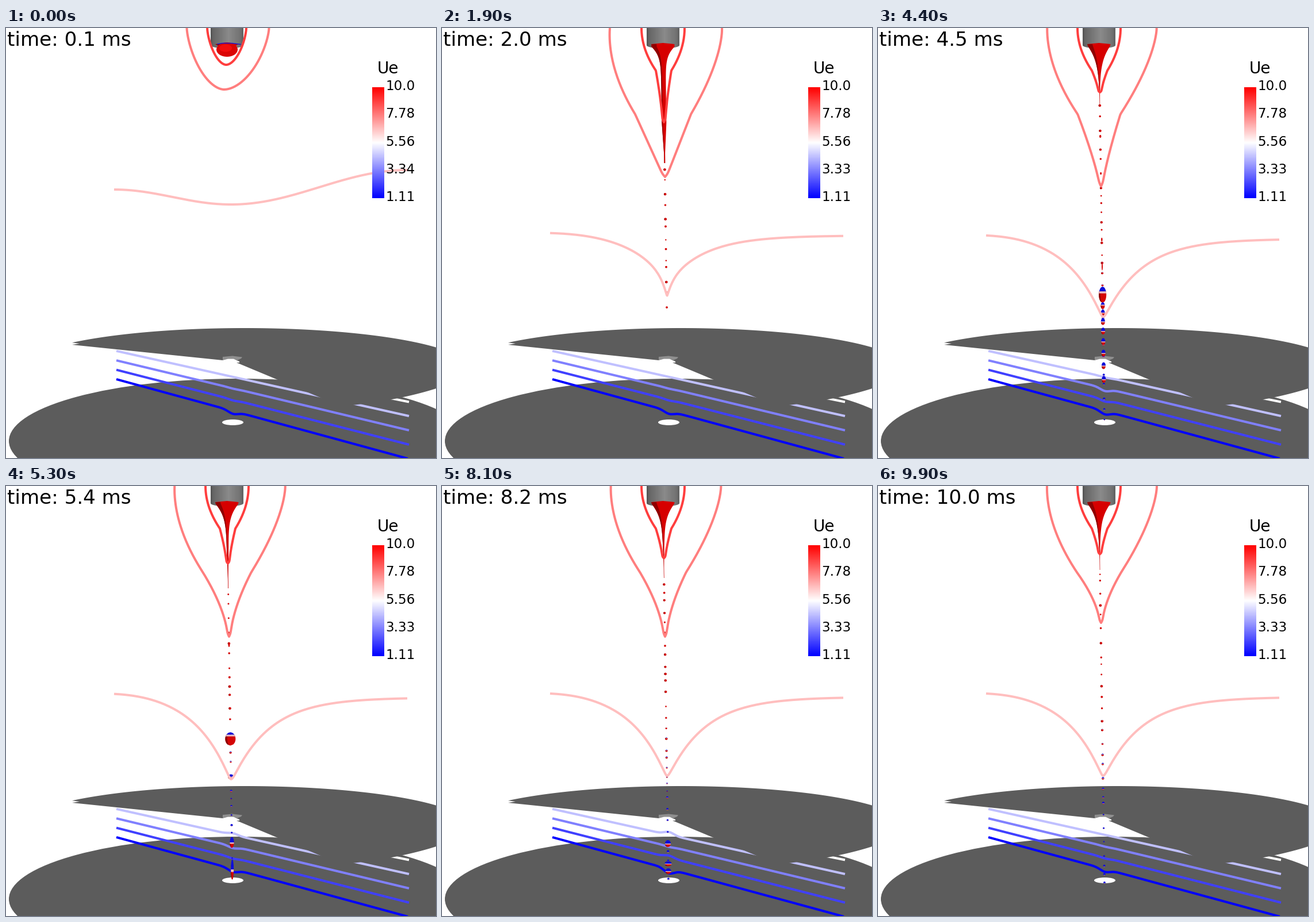
A matplotlib script for the animation above (10 s loop, 748x748 px).

```python
import numpy as np
import matplotlib.pyplot as plt
from matplotlib.animation import FuncAnimation
from matplotlib.collections import PolyCollection
from matplotlib.patches import Ellipse, Polygon

SIZE, DPI, FRAMES = 748, 100, 100
PX = 72 / DPI
GREY = "#5c5c5c"
FALL = 28        # drop speed, pixels per frame
FLOOR = 690
FIRST = 19       # frame at which the first jet is fully drawn out

# Turning points of the pulsating jet: lowest points of jet and contours
POSE = [0, FIRST, 35, 53, 66, 81, 99]
JET_TIP = [235, 235, 88, 178, 108, 160, 146]
MID_TIP = [107, 259, 289, 262, 297, 262, 238]
FAR_TIP = [466, 466, 495, 510, 497, 504, 504]
NECK = [1, 1, 0.9, 1.6, 3, 1.6, 1.6]

# Merged drops: frame, height, half width, half height
BLOBS = [(35, 212, 6.5, 14), (35, 481, 4, 4.5), (35, 582, 4.8, 5.5),
         (53, 440, 9, 11.5), (53, 506, 5, 4.5), (53, 620, 3.6, 9.5), (53, 667, 2.5, 18),
         (66, 288, 4.6, 5), (66, 311, 4, 4), (66, 640, 7.5, 23),
         (81, 622, 5, 6), (81, 657, 6, 4.5), (81, 670, 5, 5)]
BLOBS += [(35, 231 + 12 * i + 0.9 * i * i, 3.5, 6) for i in range(8)]

plt.rcParams["font.family"] = "DejaVu Sans"
fig = plt.figure(figsize=(SIZE / DPI, SIZE / DPI), dpi=DPI, facecolor="white")
ax = fig.add_axes([0, 0, 1, 1])


def level(v):
    return plt.cm.bwr((v - 1) / 8)


def ease(t):
    t = np.clip(t, 0, 1)
    return t * t * (3 - 2 * t)


def mix(a, b, t):
    return a + (b - a) * t


def pulse(values, n):
    """Eased value between the turning points."""
    k = min(int(np.searchsorted(POSE, n, side="right")) - 1, len(POSE) - 2)
    return mix(values[k], values[k + 1], ease((n - POSE[k]) / (POSE[k + 1] - POSE[k])))


def axis_x(y):
    return 384.4 + 0.0145 * (y - 30)


# Contours
DEPTH = 1 - np.linspace(1, 0, 120) ** 1.5


def flank(tip, knee, top, drop, bend, spread, neck):
    """Half width of a contour: a round shoulder above a narrowing neck."""
    y = DEPTH * tip
    k = min(knee, 0.85 * tip)

    def shoulder(h):
        return top - drop * (h / knee) ** bend + spread * (3 + 0.08 * h)

    v = np.clip((tip - y) / (tip - k), 0, 1)
    tail = (shoulder(k) - 2.5) * v ** neck + 2.5 * np.tanh(20 * v)
    return np.where(y < k, shoulder(y), tail)


def hanging(tip, grown, center, bell, left, right, *shape):
    """Contour around the jet, growing from a bell into its drawn-out form."""
    rest = np.maximum(1 - DEPTH ** 1.5, 0) ** 0.55
    w0, w1 = (mix(b * rest, flank(tip, *side, *shape), grown)
              for b, side in zip(bell, (left, right)))
    y = DEPTH * tip
    c = mix(*center, grown)
    return np.r_[c - w0, (c + w1)[::-1]], np.r_[y, y[::-1]]


FAR_X = np.r_[np.linspace(188, 375, 50), np.linspace(376, 408, 50), np.linspace(409, 698, 60)]


def far_contour(tip, grown, spike):
    d = FAR_X - 391.5
    left = d < 0
    u = np.abs(d) / np.where(left, 203.5, 306.5)
    rest = 307 - np.where(left, 13, 30) * (1 - np.cos(np.pi * u))
    edge = np.where(left, 356 + 0.1 * (tip - 466), 361 + 0.16 * (tip - 466))
    base = tip - 26 * spike
    r = np.hypot(u, 0.012) - 0.012
    rise = 1 - np.exp(-np.where(left, 3.4 * r + 1.5 * r**4, 4.7 * r))
    steady = base - (base - edge) * rise + 26 * spike * np.exp(-np.abs(d) / 9)
    return FAR_X, mix(rest, steady, grown)


# Drops: a seeded stream of small ones plus the merged ones
rng = np.random.default_rng(4)
BORN = FIRST - (486 - 60) / FALL + np.cumsum(np.r_[0, rng.uniform(0.35, 0.95, 170)])
RADIUS = rng.uniform(1.2, 2.3, BORN.size)


def merged(n):
    for at, y0, w, h in BLOBS:
        y = y0 + FALL * (n - at)
        if 0 < y < FLOOR:
            size = min(1, (y / y0) ** 2)
            yield y, w * size, h * size


def band(x, y, w, h, u0, u1, left=-1, right=1):
    """Slice of an ellipse between relative heights u0 and u1."""
    u = np.linspace(u0, u1, 11)
    r = w * np.sqrt(np.clip(1 - u * u, 0, 1))
    return np.r_[np.c_[x + left * r, y + u * h],
                 np.c_[x + right * r, y + u * h][::-1]]


def drop_shapes(n, tip):
    drops = [(60 + FALL * (n - b), r, r) for b, r in zip(BORN, RADIUS)] + list(merged(n))
    polys, colors = [], []

    def add(color, *args):
        polys.append(band(*args))
        colors.append(color)

    for y, w, h in drops:
        if not tip < y < FLOOR:
            continue
        x = axis_x(y)
        blue = 0 if n <= FIRST else np.clip((y - 400) / 220, 0, 0.5 if h > 4 else 0.85)
        cut = 2 * blue - 1
        add((0.83, 0.02, 0.02), x, y, w, h, cut, 1)
        if w > 2:
            add((0.55, 0, 0), x, y, w, h, cut, 1, -1, -0.6)
        if blue > 0:
            add((0.05, 0.05, 0.85), x, y, w, h, -1, cut)
            if w > 1.5:
                add((0.9, 0.75, 0.78), x, y, w, h, cut, min(1, cut + 0.25))
    return polys, colors


# Plates
ax.add_patch(Ellipse((405, 718.5), 800, 217, fc=GREY, zorder=1))
ax.add_patch(Ellipse((394.5, 686), 37, 10, fc="white", zorder=1.5))
x = np.linspace(115, 765, 140)
rim = np.c_[x, 592 - 70 * np.sqrt(1 - ((x - 415) / 390) ** 2)]
t = np.linspace(0, 1, 30)[:, None]
under = ((1 - t) ** 2 * np.array([750, 626.5]) + 2 * t * (1 - t) * np.array([680, 649])
         + t**2 * np.array([583, 658]))
cut_edge = [(401, 582), (406, 582), (406, 580), (401, 578), (377, 578), (115, 551), (128, 549)]
ax.add_patch(Polygon(np.r_[rim, under, cut_edge], fc=GREY, lw=0, zorder=3))
ax.add_patch(Polygon([(377, 572), (394, 570.5), (411, 572.5), (409, 575), (402, 578),
                      (396, 575.5), (386, 575.5), (377, 578)], fc="#8f8f8f", lw=0, zorder=3.1))
ax.add_patch(Polygon([(377, 578), (386, 575.5), (396, 575.5), (401, 578)],
                     fc="white", lw=0, zorder=3.2))
ax.plot([560, 701], [622, 650.5], color="white", lw=4 * PX, solid_capstyle="butt", zorder=2)

# Nozzle
shade = np.interp(np.linspace(0, 1, 57), [0, 0.08, 0.55, 0.9, 1], [0.33, 0.4, 0.54, 0.45, 0.38])
nozzle = ax.imshow(shade[None], cmap="gray", vmin=0, vmax=1, extent=(356, 413, 36, 0),
                   aspect="auto", zorder=4)
a = np.linspace(0, np.pi, 40)
body = Polygon(np.r_[[(356, 0), (413, 0)],
                     np.c_[384.5 + 28.5 * np.cos(a), 30 + 5.5 * np.sin(a)]],
               fc="none", ec="none")
ax.add_patch(body)
nozzle.set_clip_path(body)

# Colour bar
ax.imshow(np.linspace(1, 0, 256)[:, None], cmap="bwr", extent=(637, 658, 296, 103),
          aspect="auto", zorder=7)
ax.text(646, 79, "Ue", size=28 * PX, zorder=8)
labels = [ax.text(660, 108 + 48.25 * i, s, size=23 * PX, zorder=8)
          for i, s in enumerate(("10.0", "7.78", "5.56", "3.33", "1.11"))]
clock = ax.text(2, 30.5, "", size=34.1 * PX, zorder=8)


def stroke(v, z, w=4):
    return ax.plot([], [], color=level(v), lw=w * PX, solid_capstyle="butt",
                   solid_joinstyle="round", zorder=z)[0]


far, mid, near = (stroke(v, 6) for v in (6, 7, 8))
rays = [(stroke(4 - i, 2), 561.8 + 16.4 * i, 0.2224 + 0.0166 * i) for i in range(4)]
ray_x = np.linspace(192, 701, 255)

jet = Polygon([(0, 0)] * 3, fc=(0.84, 0, 0), lw=0, zorder=5)
jet_shade = Polygon([(0, 0)] * 3, fc=(0.56, 0, 0), lw=0, zorder=5.1)
ball = Ellipse((384.5, 37.5), 37, 25, fc=(0.86, 0.02, 0.02), zorder=5.2)
gloss = Ellipse((382, 35), 22, 13, fc=(0.95, 0.05, 0.05), zorder=5.3)
for p in (jet, jet_shade, ball, gloss):
    ax.add_patch(p)
lip, = ax.plot([368, 376, 393, 408], [28, 26.5, 26.5, 28.5], color=(0.1, 0.1, 0.8),
               lw=1.5 * PX, zorder=5.4)
spray = PolyCollection([], lw=0, zorder=5.5)
ax.add_collection(spray)

ax.set_xlim(0, SIZE)
ax.set_ylim(SIZE, 0)
ax.axis("off")


def draw_jet(tip, start):
    pull = np.clip((tip - 88) / 147, 0, 1)
    length = mix(8, 37 - 0.09 * tip, start)
    width = 0.8 + 3.2 * pull**3
    y = np.linspace(28, tip, 90)
    half = (20 * np.exp(-((y - 28) / length) ** 1.2)
            + width * np.clip((tip - y) / 70, 0.25, 1))
    half = np.minimum(half, 20)
    x = axis_x(y)
    jet.set_xy(np.r_[[(384.5, 26)], np.c_[x + half, y], np.c_[x - half, y][::-1]])
    jet_shade.set_xy(np.r_[np.c_[x - half, y], np.c_[x - 0.55 * half, y][::-1]])
    for p, w, h in ((ball, 37, 25), (gloss, 22, 13)):
        p.set_visible(start < 1)
        p.width, p.height = w * (1 - start), h * (1 - start)


def update(n):
    clock.set_text(f"time: {(n + 1) / 10:.1f} ms")
    labels[3].set_text("3.34" if n == 0 else "3.33")
    lip.set_visible(n < 3)

    grown = ease(n / FIRST)
    front = max(50, 486 - FALL * (FIRST - n))
    tip = min(pulse(JET_TIP, n), front)
    draw_jet(tip, ease(n / 6))

    spread = np.clip((tip - 100) / 135, 0, 1)
    far.set_data(*far_contour(pulse(FAR_TIP, n), grown, 1 - ease((n - FIRST) / 16)))
    mid.set_data(*hanging(pulse(MID_TIP, n), grown, (379.5, 388), (65, 78),
                          (150, 93, 56, 1.85), (150, 96, 66, 1.51), spread, pulse(NECK, n)))
    near.set_data(*hanging(mix(64, 44 + 0.51 * tip, grown), grown, (383, 386), (33, 35),
                           (74, 39, 25, 2), (74, 36, 23, 2), 0, 1.4))

    # Passing drops push the rays apart; the lowest one sags at the hole
    for i, (line, y0, slope) in enumerate(rays):
        y = y0 + slope * (ray_x - 192)
        gap = np.interp(394, ray_x, y)
        dip = 5 if i == 3 else i * 0.7
        dip += sum(1.3 * w * np.tanh((gap - d) / 5) * np.exp(-abs(gap - d) / 25)
                   for d, w, _ in merged(n))
        line.set_data(ray_x, y + dip * np.exp(-((ray_x - 395) / 12) ** 2))

    polys, colors = drop_shapes(n, tip)
    spray.set_verts(polys)
    spray.set_facecolor(colors)
    return []


anim = FuncAnimation(fig, update, frames=FRAMES, interval=100, repeat=True,
                     repeat_delay=0, blit=False)
plt.show()
```
